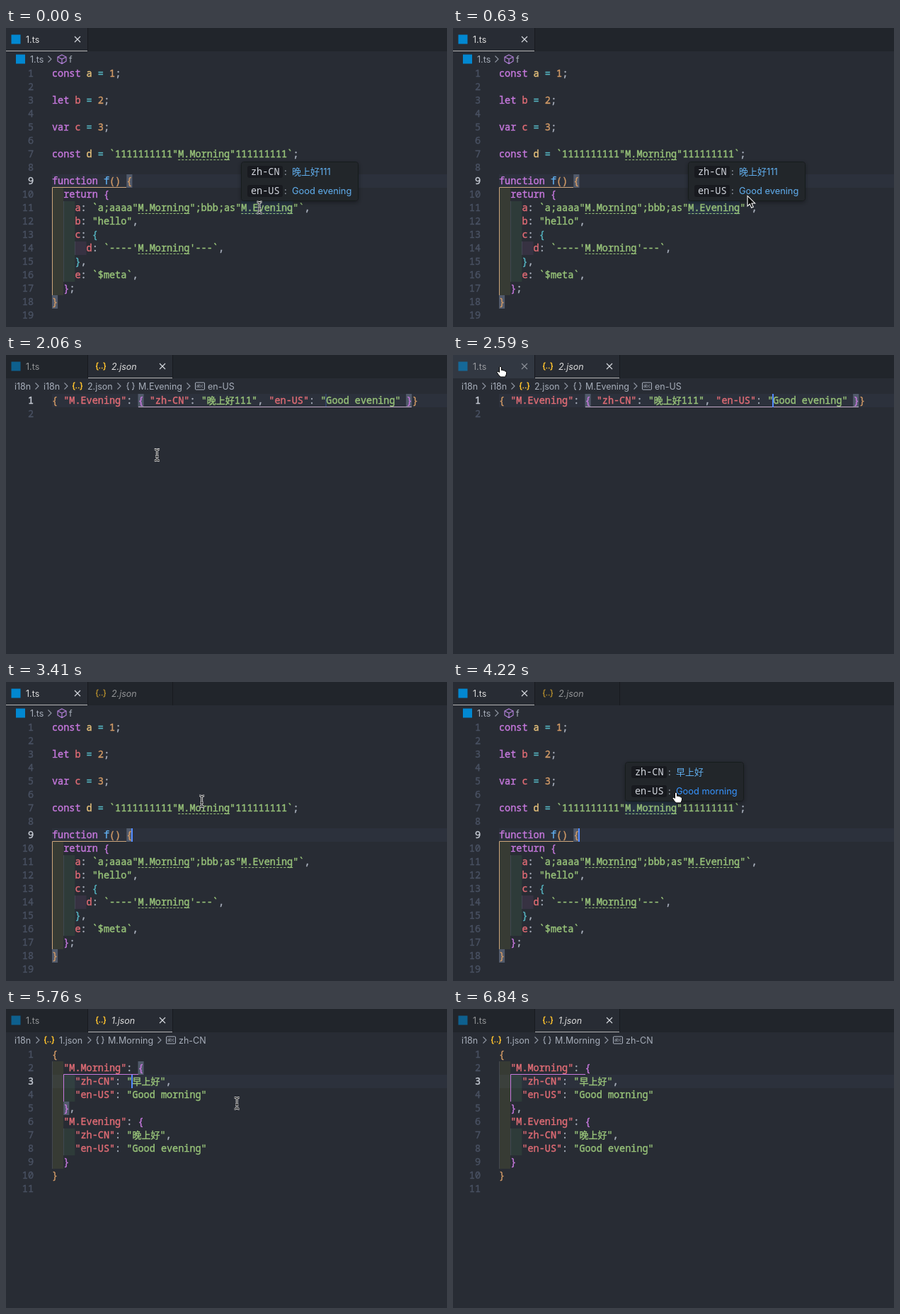
An HTML page that plays this animation: 623 px wide and 423 px high, repeating every 6.86 s.

```html
<!DOCTYPE html>
<html lang="en">
<head>
<meta charset="utf-8">
<title>Editor translation hover</title>
<style>
html, body { margin: 0; width: 100%; height: 100%; overflow: hidden; background: #282c34; }
svg { display: block; }
text { white-space: pre; }
.code { font: 500 13.5px "Noto Sans Mono", "DejaVu Sans Mono", monospace; stroke-width: .4px; }
.ui { font: 400 12.5px Inter, "Noto Sans CJK SC", sans-serif; }
.tip .ui { font-size: 12.85px; }
.cjk { font-family: "Noto Sans CJK SC", "Noto Sans CJK", sans-serif; font-size: 13px; }
</style>
</head>
<body>
<svg id="stage" width="623" height="423" viewBox="0 0 623 423"></svg>
<script>
const LOOP = 6860, LEFT = 65, CHAR = 8.1, ROW = 19, TOP = 55, BASE = 13.7;
const COLORS = {
  p: '#c678dd', y: '#e5c07b', c: '#56b6c2', o: '#d19a66', r: '#e06c75',
  g: '#98c379', b: '#61afef', f: '#abb2bf'
};
const INDENT = ['rgba(255,255,64,.07)', 'rgba(127,255,127,.07)', 'rgba(255,127,255,.07)'];

const colX = col => LEFT + col * CHAR;
const rowY = line => TOP + (line - 1) * ROW;
// Fill plus a hairline stroke gives the medium weight of the code font
const ink = color => `fill="${color}" stroke="${color}"`;
const rect = (x, y, w, h, fill, extra = '') =>
  `<rect x="${x}" y="${y}" width="${w}" height="${h}" fill="${fill}" ${extra}/>`;
const path = (d, stroke, extra = '') => `<path d="${d}" fill="none" stroke="${stroke}" ${extra}/>`;
const wrapCjk = s => s.replace(/[\u4e00-\u9fff]+/g, m => `<tspan class="cjk">${m}</tspan>`);
const label = (x, y, s, fill, extra = '') =>
  `<text class="ui" x="${x}" y="${y}" fill="${fill}" ${extra}>${wrapCjk(s)}</text>`;
const group = (id, body, extra = '') => `<g id="${id}" ${extra}>${body}</g>`;

// "~x" switches the colour of the text that follows
function codeLine(src, line) {
  const spans = src.split('~').slice(1)
    .map(s => `<tspan ${ink(COLORS[s[0]])}>${wrapCjk(s.slice(1))}</tspan>`).join('');
  return `<text class="code" x="${LEFT}" y="${rowY(line) + BASE}">${spans}</text>`;
}

function indentBand(level, from, to) {
  const x = colX(level * 2), y = rowY(from), h = (to - from + 1) * ROW;
  return rect(x, y, CHAR * 2, h, INDENT[level]) + rect(Math.floor(x), y, 1, h, '#4b5263', 'opacity=".6"');
}

const bracketBox = (col, line) => rect(colX(col), rowY(line), CHAR, ROW, '#515a6b');

function page(id, { lines, active, bands = [], brackets, scope, scopeColor, under = '' }) {
  const numbers = lines.map((_, i) =>
    `<text class="code" x="39" y="${rowY(i + 1) + BASE}" text-anchor="end" ${
      ink(i + 1 === active ? '#c5cad3' : '#495162')}>${i + 1}</text>`).join('');
  return group(id,
    rect(LEFT, rowY(active), 560, ROW, '#2c313c') +
    bands.map(b => indentBand(...b)).join('') +
    group(id + 'Match', brackets.map(b => bracketBox(...b)).join('')) +
    under + numbers + lines.map((s, i) => codeLine(s, i + 1)).join('') +
    path(scope, scopeColor));
}

const keyRange = (col, line) =>
  path(`M${colX(col)} ${rowY(line) + 17.5}h${CHAR * 9}`, COLORS.g, 'stroke-dasharray="3 2"');
const wordGlow = (id, col, line) =>
  rect(colX(col), rowY(line), CHAR * 9, ROW, '#264f78', `id="${id}" fill-opacity=".22"`);

const tsPage = page('ts', {
  active: 9,
  bands: [[0, 10, 17], [1, 11, 16], [2, 14, 14]],
  brackets: [[13, 9], [0, 18]],
  scope: 'M170 225.5H65.5V378', scopeColor: '#cda67c',
  under: wordGlow('glowEvening', 33, 11) + wordGlow('glowMorning', 22, 7) +
    [[22, 7], [15, 11], [33, 11], [15, 14]].map(k => keyRange(...k)).join(''),
  lines: [
    '~pconst ~ya ~c= ~o1~f;', '',
    '~plet ~rb ~c= ~o2~f;', '',
    '~pvar ~rc ~c= ~o3~f;', '',
    '~pconst ~yd ~c= ~g`1111111111"M.Morning"111111111`~f;', '',
    '~pfunction ~bf~o() {',
    '~p  return {',
    '~r    a~f: ~g`a;aaaa"M.Morning";bbb;as"M.Evening"`~f,',
    '~r    b~f: ~g"hello"~f,',
    '~r    c~f: ~c{',
    "~r      d~f: ~g`----'M.Morning'---`~f,",
    '~c    }~f,',
    '~r    e~f: ~g`$meta`~f,',
    '~p  }~f;',
    '~o}', ''
  ]
});

const eveningPage = page('evening', {
  active: 1,
  brackets: [[15, 1], [61.75, 1]],
  scope: 'M187 73.5H573', scopeColor: '#c3aac9',
  lines: [
    '~o{ ~r"M.Evening"~f: ~p{ ~r"zh-CN"~f: ~g"晚上好111"~f, ~r"en-US"~f: ~g"Good evening" ~p}~o}', ''
  ]
});

const morningPage = page('morning', {
  active: 3,
  bands: [[0, 2, 9], [1, 3, 4], [1, 7, 8]],
  brackets: [[15, 2], [2, 5]],
  scope: 'M187 92.5H81.5V131', scopeColor: COLORS.p,
  lines: [
    '~o{',
    '~r  "M.Morning"~f: ~p{',
    '~r    "zh-CN"~f: ~g"早上好"~f,',
    '~r    "en-US"~f: ~g"Good morning"',
    '~p  }~f,',
    '~r  "M.Evening"~f: ~p{',
    '~r    "zh-CN"~f: ~g"晚上好"~f,',
    '~r    "en-US"~f: ~g"Good evening"',
    '~p  }',
    '~o}', ''
  ]
});

// Curly brace pair whose halves sit `gap` from the centre
const braces = (x, y, gap) =>
  `M${x - gap} ${y - 5}q-2 0-2 2v1.5q0 1.5-1.5 1.5q1.5 0 1.5 1.5v1.5q0 2 2 2` +
  `M${x + gap} ${y - 5}q2 0 2 2v1.5q0 1.5 1.5 1.5q-1.5 0-1.5 1.5v1.5q0 2-2 2`;

// Small icons, centred on (x, y)
const icons = {
  file: (x, y) => rect(x - 6.5, y - 6.5, 13, 13, '#0288d1'),
  json: (x, y) => path(braces(x, y, 3.5) + `M${x - 2.5} ${y + 2.5}h1.6m1.8 0h1.6`,
    '#fbc02d', 'stroke-width="1.5"'),
  object: (x, y) => path(braces(x, y, 2), '#abb2bf', 'stroke-width="1.1"'),
  cube: (x, y) => path(`M${x} ${y - 6}l6 3v6l-6 3.5l-6-3.5v-6zM${x - 6} ${y - 3}l6 3l6-3M${x} ${y}v6.5`,
    '#b180d7', 'stroke-width="1.2"'),
  string: (x, y) => rect(x - 6.5, y - 5, 13, 10, 'none', 'stroke="#abb2bf" rx="1"') +
    `<text class="ui" x="${x}" y="${y + 2}" text-anchor="middle" fill="#abb2bf" style="font-size:6px">abc</text>`,
  chevron: (x, y) => path(`M${x - 2.5} ${y - 4.5}l4.5 4.5l-4.5 4.5`, '#9299a5', 'stroke-width="1.1"'),
  close: (x, y) => path(`M${x - 4} ${y - 4}l8 8m0-8l-8 8`, '#d7dae0', 'stroke-width="1.1"')
};

const crumbs = (id, items) => group(id, items.map(([kind, x, s]) =>
  kind === 'text' ? label(x, 49, s, '#a6adb9') : icons[kind](x, 44)).join(''));

const tsCrumbs = crumbs('tsCrumbs', [
  ['file', 20.5], ['text', 34, '1.ts'], ['chevron', 62], ['cube', 79], ['text', 89, 'f']
]);
const eveningCrumbs = crumbs('eveningCrumbs', [
  ['text', 12, 'i18n'], ['chevron', 44], ['text', 53, 'i18n'], ['chevron', 85], ['json', 101],
  ['text', 115, '2.json'], ['chevron', 160], ['object', 176], ['text', 187, 'M.Evening'],
  ['chevron', 258], ['string', 274], ['text', 285, 'en-US']
]);
const morningCrumbs = crumbs('morningCrumbs', [
  ['text', 12, 'i18n'], ['chevron', 45], ['json', 61], ['text', 75, '1.json'], ['chevron', 118],
  ['object', 133], ['text', 144, 'M.Morning'], ['chevron', 217], ['string', 233], ['text', 244, 'zh-CN']
]);

const tabs = rect(0, 0, 623, 33, '#21252b') +
  rect(0, 0, 115, 33, '#282c34', 'id="tsTab"') +
  group('tsTabLabel', icons.file(14, 16) + label(28, 20.5, '1.ts', '#dcdcdc')) +
  group('tsClose', icons.close(101, 16)) + rect(115, 0, 1, 33, '#181a1f') +
  group('jsonTab', rect(116, 0, 119, 33, '#282c34', 'id="jsonTabFill"') +
    group('jsonTabLabel', icons.json(134, 16) +
      label(149, 20.5, '2.json', '#dcdcdc', 'id="jsonName" style="font-style:italic"')) +
    group('jsonClose', icons.close(221, 16)) + rect(235, 0, 1, 33, '#181a1f')) +
  rect(0, 32, 115, 1, '#b4b4b4', 'id="tabLine"');

function tooltip(id, x, y, w, zh, en) {
  const row = (dy, lang, s, linkId) =>
    rect(9, dy - 8, 50, 17, '#181a1f', 'rx="3"') +
    `<text class="code" x="14" y="${dy + 4.8}" fill="#d3d7de">${lang}</text>` +
    label(61, dy + 4.6, ':', '#abb2bf') + label(72, dy + 4.6, s, COLORS.b, `id="${linkId}"`);
  return group(id, rect(.5, .5, w - 1, 55, '#21252b', 'stroke="#181a1f" rx="3" filter="url(#shadow)"') +
    row(14, 'zh-CN', zh, id + 'Zh') + row(41, 'en-US', en, id + 'En'),
    `class="tip" transform="translate(${x} ${y})"`);
}

const beam = 'M-3.5-8Q0-8 0-6Q0-8 3.5-8M0-6V6M-3.5 8Q0 8 0 6Q0 8 3.5 8M-2 2H2';
const arrow = 'M0 0V14.5L3.3 11.4L5.6 16.8L8.2 15.7L5.9 10.5H10.6Z';
const hand = 'M-1.5 8V1Q0-1 1.5 1V5.5Q3.5 4.2 4 6Q6 5 6.5 7Q8.5 6.5 8.5 8.5V11Q7.5 13 7 15H0Q-3 12-5 8.5Q-4.5 6-1.5 8.5Z';
const pointers =
  group('ibeam', path(beam, '#fff', 'stroke-width="2.8"') + path(beam, '#111', 'stroke-width="1.1"')) +
  group('arrow', `<path d="${arrow}" fill="#000" stroke="#fff" stroke-width="1.1"/>`) +
  group('hand', `<path d="${hand}" fill="#fff" stroke="#000"/>`);

const stage = document.getElementById('stage');
stage.innerHTML =
  '<defs><filter id="shadow" x="-20%" y="-30%" width="140%" height="170%">' +
  '<feDropShadow dx="0" dy="2" stdDeviation="3" flood-color="#000" flood-opacity=".36"/></filter></defs>' +
  rect(0, 0, 623, 423, '#282c34') + tabs + tsCrumbs + eveningCrumbs + morningCrumbs +
  tsPage + eveningPage + morningPage + rect(0, 0, 2, ROW, '#528bff', 'id="caret"') +
  tooltip('tipEvening', 332, 189, 166, '晚上好111', 'Good evening') +
  tooltip('tipMorning', 243, 113, 168, '早上好', 'Good morning') +
  group('pointer', pointers);

const el = {};
stage.querySelectorAll('[id]').forEach(n => el[n.id] = n);
const set = (id, name, value) => el[id].setAttribute(name, value);
const show = (id, on) => set(id, 'display', on ? 'inline' : 'none');

// Mouse path: time, x, y
const MOUSE = [
  [60, 358, 254], [200, 364, 253], [420, 398, 246], [630, 416, 237.5], [745, 421, 235],
  [1920, 421, 235], [1980, 340, 203], [2060, 214, 142], [2180, 130, 75], [2330, 84, 34], [2560, 67, 16],
  [2950, 67, 16], [3080, 110, 45], [3240, 210, 125], [3400, 275, 168], [3540, 296, 178],
  [4000, 296, 178], [4100, 302, 172], [4220, 315, 156], [4450, 322, 142], [4660, 326, 134], [4740, 326, 133],
  [5760, 326, 133], [5900, 350, 180], [6080, 430, 290], [6260, 500, 395], [6380, 512, 440]
];
// Caret opacity: time, value
const CARET = [
  [60, 0], [160, 1], [300, 1], [480, 0], [930, 0], [1070, 1], [1900, 1], [2100, 0], [2420, 0], [2590, 1],
  [3600, 1], [3790, 0], [4040, 0], [4200, 1], [4560, 1], [4780, 0], [5060, 0], [5100, 1],
  [5800, 1], [6000, 0], [6200, 0], [6380, 1], [6740, 1], [6840, 0]
];
const TIP_FADE = [[3610, 0], [3790, 1]];

function sample(keys, t, i = 1) {
  const n = keys.findIndex(k => k[0] > t);
  if (n === 0) return keys[0][i];
  if (n < 0) return keys[keys.length - 1][i];
  const a = keys[n - 1], b = keys[n];
  return a[i] + (b[i] - a[i]) * (t - a[0]) / (b[0] - a[0]);
}

const pageAt = t => t < 1270 || (t >= 2920 && t < 5060) ? 'ts' : t < 2920 ? 'evening' : 'morning';
const caretSpot = { ts: [177, 9], evening: [451, 1], morning: [177, 3] };

function render(t) {
  const current = pageAt(t), crumb = pageAt(t - 40), ts = current === 'ts';
  for (const id of ['ts', 'evening', 'morning']) {
    show(id, id === current);
    show(id + 'Crumbs', id === crumb);
  }
  show('morningMatch', t < 6740);

  const x = sample(MOUSE, t, 1), y = sample(MOUSE, t, 2);
  const overTab = y < 33 && x < 115;
  set('tsTab', 'fill', ts ? '#282c34' : overTab ? '#323842' : '#21252b');
  set('tsTabLabel', 'opacity', ts ? 1 : .6);
  show('tsClose', ts || overTab);
  set('tsClose', 'opacity', ts ? 1 : .55);
  show('jsonTab', t >= 1270);
  set('jsonTabFill', 'fill', ts ? '#21252b' : '#282c34');
  set('jsonTabLabel', 'opacity', ts ? .6 : 1);
  show('jsonClose', !ts);
  el.jsonName.textContent = current === 'morning' ? '1.json' : '2.json';
  set('tabLine', 'x', ts ? 0 : 116);
  set('tabLine', 'width', ts ? 115 : 119);

  const [cx, line] = caretSpot[current];
  set('caret', 'x', cx);
  set('caret', 'y', rowY(line));
  set('caret', 'opacity', sample(CARET, t));

  const firstTip = t < 1270, secondTip = ts && t >= 3610;
  show('tipEvening', firstTip);
  show('glowEvening', firstTip);
  show('tipMorning', secondTip);
  show('glowMorning', secondTip);
  set('tipMorning', 'opacity', sample(TIP_FADE, t));

  let kind = y < 33 ? 'hand' : y < 54 ? 'arrow' : 'ibeam';
  const hover = (id, left, top, width) => {
    const inside = x > left && x < left + width && y > top && y < top + 56;
    const onLink = dy => inside && x > left + 68 && y > top + dy - 9 && y < top + dy + 7;
    const zh = onLink(14), en = onLink(41);
    set(id + 'Zh', 'fill', zh ? '#3794ff' : COLORS.b);
    set(id + 'En', 'fill', en ? '#3794ff' : COLORS.b);
    if (inside) kind = zh || en ? 'hand' : 'arrow';
  };
  if (firstTip) hover('tipEvening', 332, 189, 166);
  if (secondTip) hover('tipMorning', 243, 113, 168);
  for (const id of ['ibeam', 'arrow', 'hand']) show(id, id === kind);
  set('pointer', 'transform', `translate(${x} ${y})`);
}

const start = performance.now();
function tick() {
  render((performance.now() - start) % LOOP);
  requestAnimationFrame(tick);
}
tick();
</script>
</body>
</html>
```
